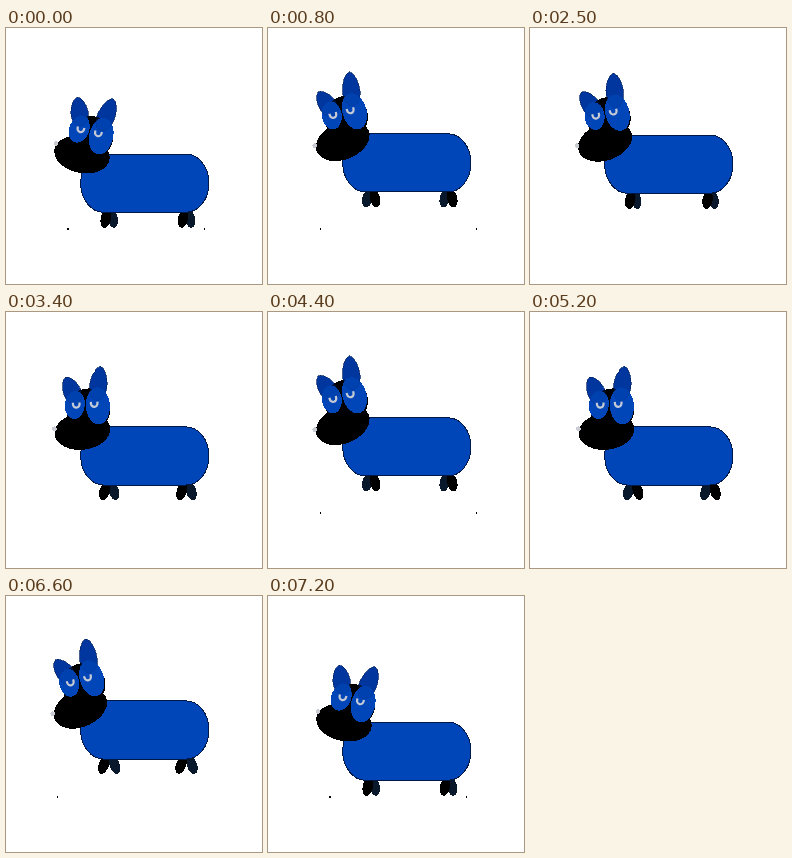
An HTML page without scripts for the animation above (7300 ms loop, 256x256 px).

```html
<!DOCTYPE html>
<html lang="en">
<head>
<meta charset="utf-8">
<title>Trotting dog</title>
<style>
  @property --t { syntax: "<angle>"; inherits: true; initial-value: 0deg; }

  html, body { margin: 0; width: 100%; height: 100%; overflow: hidden; background: #fff; }

  /* One stride bounce is 360deg of --t; the legs swing at half that speed. */
  svg {
    display: block; width: 100vw; height: 100vh;
    animation: trot 7.3s steps(73) infinite;
    --a: calc(var(--t) - 40deg);
    --lift: calc(.572 - .586 * cos(var(--a)) - .171 * cos(2 * var(--a)) - .034 * cos(3 * var(--a))
      + .102 * sin(var(--a)) + .049 * sin(2 * var(--a)));
    --swing: calc(20deg * sin(var(--t) / 2 - 38deg));
  }
  @keyframes trot { from { --t: 0deg; } to { --t: 1460deg; } }

  .bounce { transform: translateY(calc(-21px * var(--lift))); }
  .near { fill: #000; transform: rotate(calc(-1 * var(--swing))); }
  .far { fill: #0a182b; transform: rotate(var(--swing)); }

  .head { transform-origin: 41.2px 113.3px; transform: rotate(calc(-29deg * var(--lift))); }
  .snout {
    transform-origin: 50px 115px;
    transform: translate(calc(-3.5px * var(--lift)), calc(2.5px * var(--lift))) rotate(calc(-34deg * var(--lift)));
  }
  .low-ear { transform: translate(calc(1px * var(--lift)), calc(5px * var(--lift))); }
  .high-ear { transform: translateX(calc(2px * var(--lift))); }

  .blue { fill: #0046b8; }
  .ear { fill: #00369e; stroke: #001f5c; stroke-width: .6; }
  .eye { fill: none; stroke: #c5cbd6; stroke-width: 2.2; shape-rendering: auto; }

  /* Specks on the ground spread as the dog rises. */
  .left {
    transform: translateX(calc(-10px * var(--lift)));
    opacity: clamp(0, 100 * cos(2 * var(--t) - 400deg), 1);
  }
  .right {
    transform: translateX(calc(9.5px * var(--lift)));
    opacity: clamp(0, 100 * (cos(2 * var(--t) - 380deg) - .34), 1);
  }
</style>
</head>
<body>
<svg viewBox="0 0 256 256" shape-rendering="crispEdges">
  <defs>
    <ellipse id="leg" cy="16" rx="5.1" ry="9.3"/>
    <g id="legs">
      <use href="#leg" class="far"/>
      <use href="#leg" class="near"/>
    </g>
    <path id="ear" class="ear" d="M0-14C5-13 8.7-4 8.7 3S5 15 0 15-8.7 10-8.7 3-5-13 0-14"/>
    <g id="ears">
      <g class="low-ear"><use href="#ear" transform="translate(73.3 83) rotate(-8)"/></g>
      <g class="high-ear"><use href="#ear" transform="translate(101 86) rotate(22) scale(1 1.18)"/></g>
    </g>
    <path id="eye" class="eye" d="M-3.3-3v1.5a3.3 3.6 0 0 0 6.6 0V-3"/>
  </defs>

  <circle class="left" cx="62" cy="201" r=".7"/>
  <circle class="right" cx="199" cy="201" r=".7"/>

  <g class="bounce">
    <use href="#legs" x="103.2" y="175"/>
    <use href="#legs" x="180.5" y="175"/>
    <rect class="blue" x="74.7" y="126" width="128.3" height="58.2" rx="23" ry="29" stroke="#001845"/>
  </g>

  <g class="head">
    <use href="#ears"/>
    <ellipse cx="85" cy="109.5" rx="22" ry="21.5"/>
  </g>
  <g class="snout">
    <ellipse cx="76" cy="126.5" rx="28" ry="18.5" transform="rotate(11 76 126.5)"/>
    <circle cx="50" cy="115.5" r="2.4" fill="#c9ccd2"/>
  </g>
  <g class="head">
    <ellipse class="blue" cx="73.3" cy="101" rx="10" ry="14" transform="rotate(20 73.3 101)"/>
    <ellipse class="blue" cx="95.2" cy="108" rx="12" ry="18.5" transform="rotate(12 95.2 108)"/>
    <use href="#ears" opacity=".3"/>
    <use href="#eye" transform="translate(74.5 102) rotate(13)"/>
    <use href="#eye" transform="translate(92 106) rotate(13)"/>
  </g>
</svg>
</body>
</html>
```
